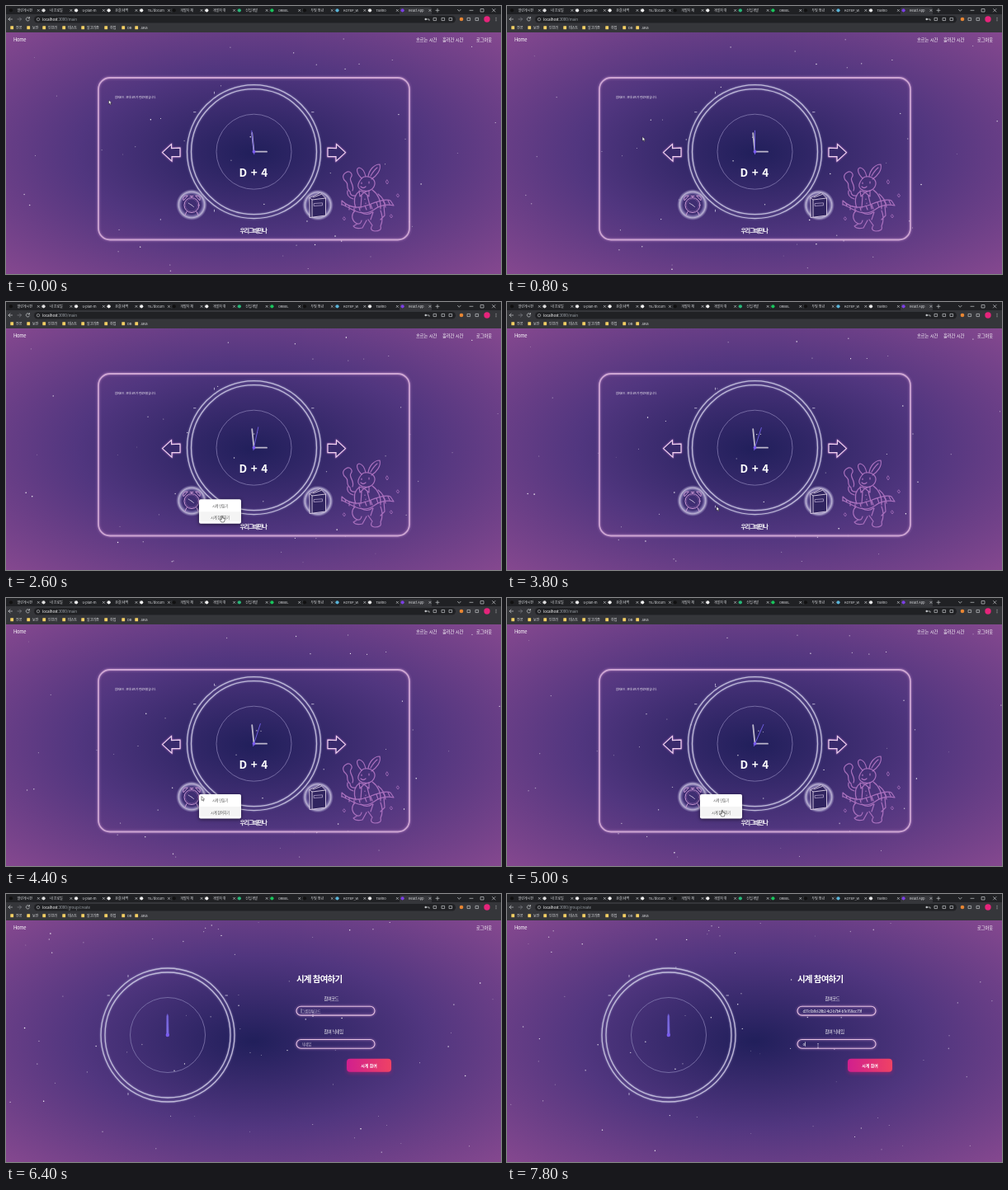
An HTML page for the animation above (8000 ms loop, 600 by 325 pixels).

```html
<!DOCTYPE html>
<html lang="ko">
<head>
<meta charset="utf-8">
<title>React App</title>
<style>
  html, body { margin: 0; width: 100%; height: 100%; overflow: hidden; background: #202124; }
  svg { display: block; width: 100vw; height: 100vh; }
  text { font-family: "Noto Sans CJK KR", "Noto Sans CJK", "Noto Sans", sans-serif; fill: #fff; }
  .line { fill: none; stroke-linecap: round; stroke-linejoin: round; }
  .nav { font-size: 5.3px; letter-spacing: -.1px; }
  .caption { font-size: 5.2px; letter-spacing: -.35px; }
  .mid { text-anchor: middle; }
  .card { fill: none; stroke: #cda5d2; filter: drop-shadow(0 0 1.5px #b684c4); }
  .field { fill: none; stroke: #e6c3e2; stroke-width: 1.1; filter: drop-shadow(0 0 1.5px #c98fd0); }
  .ring { fill: none; stroke: #bfb9d8; stroke-width: 1.3; filter: drop-shadow(0 0 1.2px #8f86bf); }
  .arrow { fill: #392a6c; stroke: #f0d3f0; stroke-width: 1.2; filter: drop-shadow(0 0 1px #c477cc); }
  .rabbit { stroke: #a970bd; stroke-width: 1.2; }
  .button { filter: drop-shadow(0 2px 2px #a8236f99); }
  .menu { filter: drop-shadow(0 1px 2px #0008); }
  .menu text { fill: #555; font-size: 4.2px; letter-spacing: -.2px; }
  .hint { fill: #cfc3dc; }
</style>
</head>
<body>
<svg viewBox="0 0 600 325" preserveAspectRatio="none">
  <defs>
    <radialGradient id="sky" cx=".5" cy=".5" r=".7071">
      <stop stop-color="#211f5b"/><stop offset=".5" stop-color="#51367f"/><stop offset="1" stop-color="#85488f"/>
    </radialGradient>
    <radialGradient id="halo">
      <stop offset=".6" stop-color="#3f2e72"/><stop offset=".72" stop-color="#6f61a0"/>
      <stop offset=".83" stop-color="#b9b0d2"/><stop offset="1" stop-color="#8f84bc" stop-opacity="0"/>
    </radialGradient>
    <linearGradient id="pink">
      <stop stop-color="#d11f8e"/><stop offset="1" stop-color="#ef4264"/>
    </linearGradient>
    <g id="dial">
      <circle class="ring" r="81"/>
      <circle class="ring" r="76"/>
      <circle r="45.5" fill="none" stroke="#7b71a9" stroke-width=".9"/>
      <path class="line" stroke="#cfc9e4" stroke-width=".8" d="M-73-48h2.500M70-48h2.500M-48-72.500v2M-48 70.500v2"/>
    </g>
    <path id="arrow" class="arrow" d="M-11 0L0-10V-5L10.500-5.500V5H.5V10.500Z"/>
  </defs>

  <g id="browser"></g>
  <rect y="32" width="600" height="293" fill="url(#sky)"/>
  <g id="stars" fill="#fff"></g>
  <text x="9" y="43" font-size="5.800" letter-spacing="-.3">Home</text>
  <text class="nav" x="570" y="42.800">로그아웃</text>

  <g id="main">
    <text class="nav" x="497" y="42.800">흐르는 시간</text>
    <text class="nav" x="529" y="42.800">흘러간 시간</text>
    <rect class="card" x="112" y="87" width="377" height="196.500" rx="14" stroke-width="1.800"/>
    <text x="132" y="112.300" font-size="3.200" letter-spacing="-.12">참여코드 : 초대 코드가 만료되었습니다.</text>
    <use href="#dial" x="300.500" y="176.700"/>
    <g class="line" transform="translate(300.5 176.7)">
      <path stroke="#bdb8cc" stroke-width="1.800" d="M0 0H15.500M0 0L-2.300-22.500"/>
      <path id="second" stroke="#6d5bdc" stroke-width="1" d="M0 3V-25.500"/>
      <circle r="1.900" fill="#7a5cf0"/>
    </g>
    <text class="mid" x="300" y="206.700" font-size="13.500" font-weight="700" letter-spacing=".4">D + 4</text>
    <use href="#arrow" x="200.500" y="177.600"/>
    <use href="#arrow" transform="translate(400.500 177.600) scale(-1 1)"/>

    <circle cx="225" cy="241" r="19" fill="url(#halo)"/>
    <g class="line" transform="translate(225 241.500)" stroke="#c997d3" stroke-width="1">
      <circle r="9"/><circle r="7.500" stroke="#8f62aa" stroke-width=".5"/>
      <path stroke="#e9dcf0" stroke-width=".7" d="M0 0L-4-2.500M0 0L2.500 2"/>
      <path d="M-10-6q-2-6 5-5.500zM10-6q2-6-5-5.500zM-2-11h4M0-11v2M-6 8l-2 4M6 8l2 4"/>
    </g>
    <circle cx="378" cy="241.500" r="19" fill="url(#halo)"/>
    <g class="line" stroke="#dcd0e6" stroke-width=".9">
      <path fill="#30245f" d="M368 232.500L381 226.500L387.500 233V254L368.500 256.500Z"/>
      <path d="M368 232.500L371 235L387.500 233M371 235V256M372 232L382 228.500"/>
      <path stroke="#b3a2cc" stroke-width=".8" d="M373.500 239.500l10-.7v3l-10 .7z"/>
    </g>
    <text class="mid" x="299.700" y="274.500" font-size="6.900" font-weight="700" letter-spacing="-.9">우리그때만나</text>

    <g class="line rabbit">
      <path d="M431 209C425 203 424 197 428 196C433 197 435 202 436 207M439 207C440 199 446 192 453 192C455 199 449 206 443 210M442 206q4-7 8-10"/>
      <path d="M431 209C427 214 425 219 429 222C434 226 443 225 446 219C449 213 445 208 439 207Q434 206 431 209M431 214v1.500M440 213v2M430 219q3 3 6 0"/>
      <path d="M434 226l-6-2l1 7zM434 226l6-2v7zM428 225C422 229 421 237 424 245M444 223C451 228 455 237 454 246M431 230L430 245M438 230L442 246M435 234v.5M436 239v.5"/>
      <path d="M424 230Q417 231 417 225M421 234Q412 231 414 224M417 225c-6-4-1-9-5-12s-5-8 0-11s9 2 6 6s5 9 2 16"/>
      <path d="M407 236Q420 249 440 241T466 236L470 242Q457 239 446 247T420 247T407 241ZM411 239l1 4M416 243v4M422 245v4M428 244l1 4M435 242l2 5M442 241l2 5M449 238l2 6M457 236l2 4M463 236l2 4"/>
      <path d="M451 228Q459 234 460 244M458 242l1 12l-5 5M423 248C417 254 420 262 426 264L421 267Q424 271 432 269L437 260M439 259L444 266Q440 272 447 273Q456 273 454 267Q458 258 454 248M430 250Q438 255 444 250M445 250l-3 9M426 264q4 1 5-4"/>
      <path stroke-width=".8" d="M462 211l1.500 2.500l-1.500 2.500l-1.500-2.500zM475 228l1.500 2l-1.500 2l-1.500-2zM467 253l1.500 2l-1.500 2l-1.500-2zM410 256l1.500 2l-1.500 2l-1.500-2z"/>
    </g>
  </g>

  <g id="join">
    <use href="#dial" x="196" y="171"/>
    <path d="M194.500 171L194.800 148L195.700 145.500L196.700 148L197.200 171Z" fill="#8170e4" stroke="#6553c8" stroke-width=".7"/>
    <circle cx="195.800" cy="171" r="2.200" fill="#7a5cf0"/>
    <text x="352" y="106.700" font-size="10.500" font-weight="700" letter-spacing="-.8">시계 참여하기</text>
    <text class="caption" x="385.500" y="129">참여코드</text>
    <rect class="field" x="352" y="136.300" width="95" height="10.800" rx="5.400"/>
    <text id="code" x="358.500" y="143.600" font-size="4.500" letter-spacing="-.35"></text>
    <text class="caption" x="385.500" y="169">참여 닉네임</text>
    <rect class="field" x="352" y="176.500" width="95" height="10.800" rx="5.400"/>
    <text id="nick" x="358.500" y="183.800" font-size="4.500" letter-spacing="-.35"></text>
    <path id="caret" stroke="#fff" stroke-width=".6" d="M0-2.700V2.700"/>
    <rect class="button" x="413" y="199.800" width="54" height="16" rx="4" fill="url(#pink)"/>
    <text class="mid" x="440" y="209.700" font-size="4.900" font-weight="700">시계 참여</text>
  </g>

  <g id="menu" class="menu">
    <rect width="51" height="29.500" rx="2" fill="#fff"/>
    <rect y="15" width="51" height="12" fill="#f4f4f4"/>
    <text class="mid" x="25.500" y="9.300">시계 만들기</text>
    <text class="mid" x="25.500" y="23.500">시계 참여하기</text>
  </g>
  <g id="pointer">
    <path id="tip" d="M0 0V5L1.200 4L2 5.800L2.900 5.400L2.100 3.600H3.600Z" fill="#fff" stroke="#111" stroke-width=".45"/>
    <path id="finger" d="M-.7-2.500q.7-.8 1.300 0V0L3 .6V3L2.200 5H-1L-2.800 2L-2 1.300L-.7 2.200Z" fill="#fff" stroke="#111" stroke-width=".5"/>
    <path id="beam" d="M-1-2.500H1M0-2.500V2.500M-1 2.500H1" fill="none" stroke="#d8d0e4" stroke-width=".5"/>
  </g>
</svg>
<script>
const LOOP = 8000, STEP = 200, JOIN_AT = 5600, PASTE_AT = 6800, NICK_AT = 7400;
const $ = id => document.getElementById(id);
const rect = (x, y, w, h, fill, rx = 0) => `<rect x="${x}" y="${y}" width="${w}" height="${h}" rx="${rx}" fill="${fill}"/>`;
const dot = (x, y, r, fill) => `<circle cx="${x}" cy="${y}" r="${r}" fill="${fill}"/>`;
const label = (x, y, s, fill) => `<text x="${x}" y="${y}" font-size="4.1" font-weight="500" letter-spacing="-.1" style="fill:${fill}">${s}</text>`;
const stroke = (d, color = '#c4c7ca') => `<path class="line" d="${d}" stroke="${color}" stroke-width=".7"/>`;

function drawBrowser() {
  const tabs = [
    ['열린게시판', '#111'], ['내 프로필', '#ddd'], ['u-plan-m', '#eee'], ['온결(새벽', '#f5f5f5'],
    ['TIL/docum', '#eee'], ['개발자 채', '#111'], ['개발자 취', '#eee'], ['신입개발', '#27b879'],
    ['ORBEL', '#19c45c'], ['두빛 청년', '#111'], ['KOTEP_W', '#5ab4d8'], ['Tavino', '#e8e8e8'], ['React App', '#7b3fe4']
  ];
  const folders = [[12, '전공'], [32, '보안'], [51, '인프라'], [75, '테스트'], [98, '알고리즘'], [126, '취업'], [147, 'DB'], [163, 'Java']];
  const tools = [510, 520, 530, 539, 552, 561, 571];
  let out = rect(0, 0, 600, 32, '#202124') + rect(0, 10, 600, 22, '#35363a') + rect(477, 1.5, 39, 10, '#35363a', 2);
  tabs.forEach(([title, color], i) => {
    const x = 6 + i * 39.55;
    out += dot(x, 5.3, 2.1, color) + label(x + 7.5, 6.9, title, '#d5d7da');
    out += stroke(`M${x + 32.2} 4.300l2.200 2.200m0-2.200l-2.200 2.200`);
    if (i < 11) out += rect(x + 36.5, 3, .4, 5, '#55575b');
  });
  out += stroke('M521 5.300h4M523 3.300v4M547.500 4.300l1.800 2l1.800-2M562 5.300h4M575.500 3.500h3.500v3.500h-3.500zM589.500 3.500l3.500 3.500m0-3.500l-3.500 3.500');
  out += rect(34, 12, 511, 8.6, '#202124', 4.3);
  out += stroke('M7.500 16h-4.500m2-2l-2 2l2 2M28.400 14.800a2.200 2.200 0 1 0 .1 2m0-3.300v1.500h-1.500') + stroke('M14 16h4.500m-2-2l2 2l-2 2', '#808388');
  out += `<circle cx="39" cy="16.200" r="1.700" fill="none" stroke="#c4c7ca" stroke-width=".6"/>`;
  out += `<text y="17.800" x="44" font-size="4.600" letter-spacing="-.1">localhost<tspan id="path" style="fill:#9aa0a6"></tspan></text>`;
  out += stroke('M509.500 16h3.500v1.500') + dot(508.7, 16, 1.2, '#c4c7ca') + dot(552, 16, 2.3, '#e88532');
  tools.filter(x => x !== 510 && x !== 552).forEach(x => out += stroke(`M${x - 1.6} 14.400h3.200v3.200h-3.200z`));
  out += dot(583, 16, 3.7, '#e6247b') + [14.3, 16, 17.7].map(y => dot(594, y, .5, '#ccc')).join('');
  folders.forEach(([x, name]) => out += rect(x - 6.7, 24.2, 3.8, 4, '#f4cf63', .5) + label(x, 27.8, name, '#e0e1e3'));
  $('browser').innerHTML = out;
}

function random(seed) {
  return () => (seed = (seed * 16807) % 2147483647) / 2147483647;
}

function makeStars(count, seed) {
  const next = random(seed);
  return Array.from({ length: count }, () => ({
    x: next() * 600, y: 33 + next() * 290, vx: (next() - .5) * 5, vy: (next() - .5) * 5,
    r: .4 + next() * .4, phase: next() * 6.28
  }));
}

const wrap = (v, size) => ((v % size) + size) % size;
function drawStars(stars, seconds) {
  $('stars').innerHTML = stars.map(s => {
    const x = wrap(s.x + s.vx * seconds, 600), y = 33 + wrap(s.y - 33 + s.vy * seconds, 291);
    const alpha = .7 + .3 * Math.sin(s.phase + seconds * 1.5);
    return `<circle cx="${x.toFixed(2)}" cy="${y.toFixed(2)}" r="${s.r.toFixed(2)}" opacity="${alpha.toFixed(2)}"/>`;
  }).join('');
}

// time, x, y
const route = [
  [0, 124.5, 114], [400, 124.5, 114], [1400, 237, 240.5], [2000, 237, 240.5], [2400, 262, 262], [2800, 262, 262],
  [3400, 254, 248], [3800, 254, 248], [4200, 237, 240.5], [4400, 237, 240.5], [4800, 261, 260], [5400, 261, 260],
  [6200, 372, 146], [6800, 372, 146], [7200, 377, 184], [8000, 377, 184]
];
function pointerAt(t) {
  const i = route.findIndex(p => p[0] > t), a = route[i - 1], b = route[i];
  const k = (t - a[0]) / (b[0] - a[0]), e = k * k * (3 - 2 * k);
  return [a[1] + (b[1] - a[1]) * e, a[2] + (b[2] - a[2]) * e];
}

const show = (id, on) => $(id).setAttribute('display', on ? 'inline' : 'none');
const move = (id, x, y) => $(id).setAttribute('transform', `translate(${x} ${y})`);
const mainStars = makeStars(48, 4711), joinStars = makeStars(65, 9127);

function fill(id, value, hint) {
  $(id).textContent = value || hint;
  $(id).setAttribute('class', value ? '' : 'hint');
}

function render(t) {
  const joining = t >= JOIN_AT, firstMenu = t >= 2000 && t < 3200, secondMenu = t >= 4400 && !joining;
  show('main', !joining);
  show('join', joining);
  $('path').textContent = joining ? ':3000/group/create' : ':3000/main';
  drawStars(joining ? joinStars : mainStars, t / 1000);
  $('second').setAttribute('transform', `rotate(${Math.floor((t + 500) / 1000) * 6 - 6})`);

  show('menu', firstMenu || secondMenu);
  move('menu', 234, firstMenu ? 239.3 : 238);
  const pasted = t >= PASTE_AT, named = t >= NICK_AT;
  fill('code', pasted && 'd37c6b0d-20b2-4c2-b7b4-b7e768ccc79f', '그룹참여코드');
  fill('nick', named && 'o', '닉네임');
  show('caret', t >= 6400);
  move('caret', named ? 361.5 : pasted ? 436 : 358, named ? 182 : 141.8);

  const [x, y] = pointerAt(t);
  const typing = t >= 6200, overMenu = (firstMenu || secondMenu) && x > 242;
  move('pointer', x, y);
  show('tip', !typing && !overMenu);
  show('finger', overMenu);
  show('beam', typing);
}

let shown = -1;
function tick(now) {
  const t = Math.floor((now % LOOP) / STEP) * STEP;
  if (t !== shown) render(shown = t);
  requestAnimationFrame(tick);
}
drawBrowser();
render(0);
requestAnimationFrame(tick);
</script>
</body>
</html>
```
